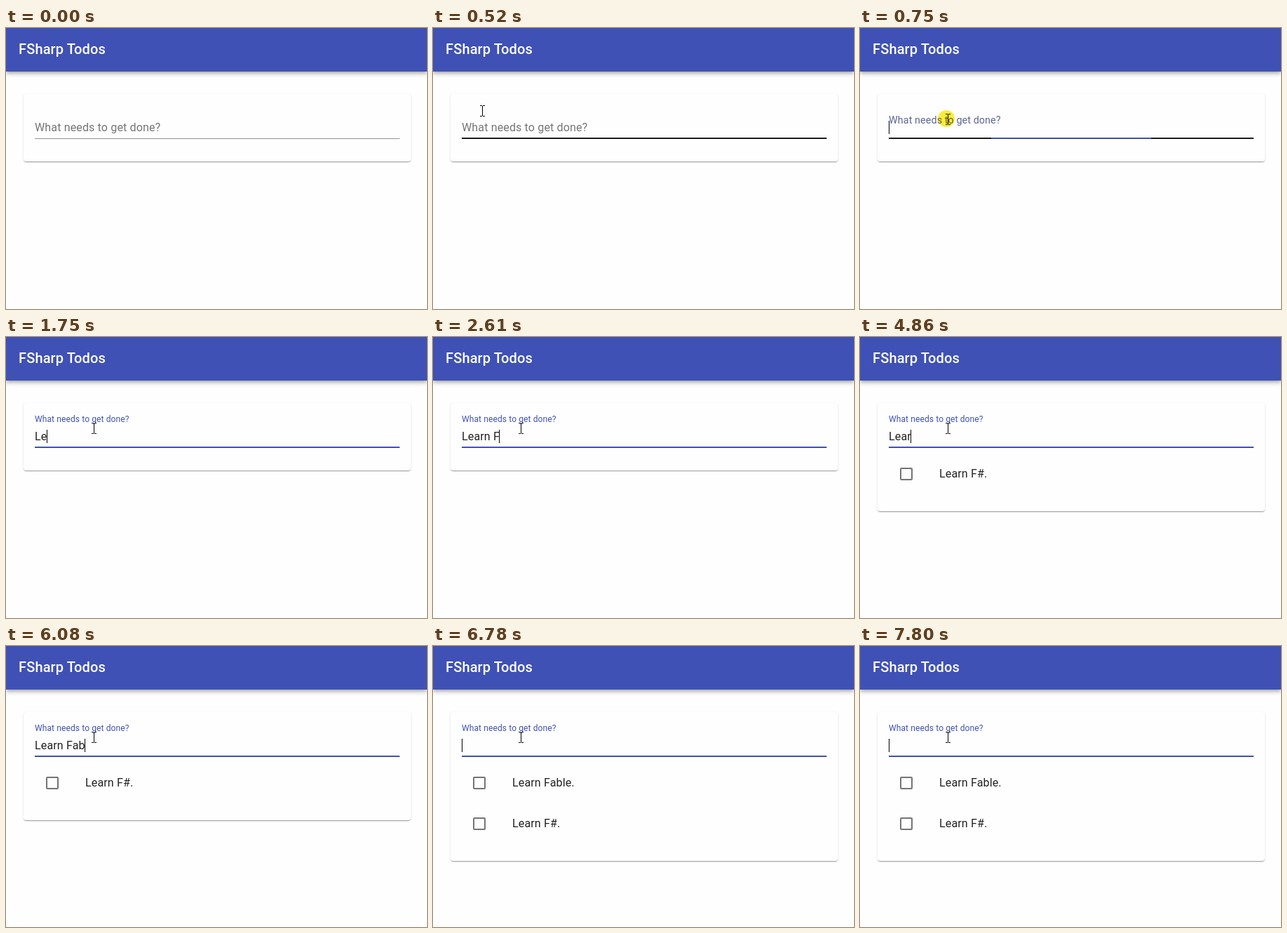
These frames come from a looping animation (600 by 400 pixels, 8 s). An HTML page:

```html
<!DOCTYPE html>
<html lang="en">
<head>
<meta charset="utf-8">
<title>FSharp Todos</title>
<style>
html, body { margin: 0; width: 100%; height: 100%; overflow: hidden; background: #fefefe; }
body { position: relative; font: 16px/19px Roboto, sans-serif; letter-spacing: .00938em; color: rgba(0,0,0,.87); }
body > *, .row * { position: absolute; white-space: pre; }
header { left: 0; top: 0; width: 100%; height: 62px; background: #3f51b5;
  box-shadow: 0 2px 4px -1px rgba(0,0,0,.2), 0 4px 5px rgba(0,0,0,.14), 0 1px 10px rgba(0,0,0,.12); }
h1 { margin: 0; position: absolute; left: 18px; top: 14px; font: 500 20px/32px Roboto, sans-serif;
  letter-spacing: .0075em; color: #fff; }
#card { left: 25px; top: 94px; width: 552px; border-radius: 4px; background: #fefefe;
  box-shadow: 0 2px 1px -1px rgba(0,0,0,.2), 0 1px 1px rgba(0,0,0,.14), 0 1px 3px rgba(0,0,0,.12); }
#label { left: 41px; top: 110px; line-height: 1; transform-origin: 0 0; }
#value { left: 41px; top: 132px; }
#caret { top: 132px; width: 1px; height: 19px; background: #000; }
#line, #focus { left: 41px; width: 520px; }
#focus { top: 156px; height: 2px; background: #3f51b5; }
.row { left: 0; }
.row i { box-sizing: border-box; left: 57px; top: -9px; width: 18px; height: 18px;
  border: 2px solid #757575; border-radius: 2px; }
.row span { left: 113px; top: -12.5px; line-height: 24px; }
#click { left: 111px; top: 117px; width: 24px; height: 24px; border-radius: 50%;
  background: #fdec3c; mix-blend-mode: multiply; }
#pointer { left: 0; top: 0; width: 600px; height: 400px; }
</style>
</head>
<body>
<header><h1>FSharp Todos</h1></header>
<div id="card"></div>
<div id="line"></div>
<div id="focus"></div>
<div id="label">What needs to get done?</div>
<div id="value"></div>
<div id="caret"></div>
<div class="row" id="row0"><i></i><span></span></div>
<div class="row" id="row1"><i></i><span></span></div>
<div id="click"></div>
<svg id="pointer">
  <path id="arrow" d="M0 0V16L4 12.500L6.500 18L9 17L6.500 11.500H11.500Z" fill="#fff" stroke="#000"/>
  <path id="beam" d="M-3-7.500H0M1-7.500H4M.5-7V7M-3 7.500H0M1 7.500H4" fill="none" stroke="#000" shape-rendering="crispEdges"/>
</svg>
<script>
const LOOP = 8000, FOCUS = 717;
const el = id => document.getElementById(id);
const clamp = x => Math.min(1, Math.max(0, x));
const mix = (a, b, k) => a + (b - a) * k;
const show = (node, on) => { node.style.visibility = on ? "visible" : "hidden"; };

// "\n" submits the typed text
const keys = [
  [1520, "L"], [1750, "e"], [1830, "ar"], [1980, "n"], [2210, " "],
  [2610, "F"], [3160, "#"], [3460, "."], [3860, "\n"],
  [4470, "L"], [4700, "e"], [4780, "a"], [4860, "r"], [5390, "n"], [5620, " "],
  [5850, "F"], [5930, "a"], [6080, "b"], [6250, "l"], [6320, "e"], [6550, "."], [6780, "\n"]
];
const blinks = [[0, FOCUS], [1290, 1520], [4390, 4470], [7330, 7800]];

// cubic-bezier(0, 0, .2, 1)
function easeOut(x) {
  let lo = 0, hi = 1;
  for (let i = 0; i < 24; i++) {
    const s = (lo + hi) / 2;
    if (.6 * (1 - s) * s * s + s ** 3 < x) lo = s; else hi = s;
  }
  return 3 * (1 - lo) * lo * lo + lo ** 3;
}

function drawField(t) {
  const k = easeOut(clamp((t - FOCUS) / 200));
  const rgb = [[117, 63], [117, 81], [117, 181]].map(([a, b]) => mix(a, b, k));
  el("label").style.color = `rgb(${rgb})`;
  el("label").style.transform = `translateY(${mix(24, 1.5, k)}px) scale(${mix(1, .75, k)})`;
  el("focus").style.transform = `scaleX(${k})`;
  const hover = t >= 440, line = el("line").style;
  line.top = hover ? "156px" : "157px";
  line.height = hover ? "2px" : "1px";
  line.background = hover ? "#1c1c1c" : "#949494";
}

function drawPointer(t) {
  const k = 1 - (1 - clamp((t - 370) / 300)) ** 2;
  const x = Math.round(mix(26, 125, k)), y = Math.round(mix(109, 130, k));
  for (const id of ["arrow", "beam"]) {
    el(id).setAttribute("transform", `translate(${x} ${y})`);
    show(el(id), t >= 370 && (id === "beam") === (x > 41));
  }
  show(el("click"), t >= 740 && t < 900);
}

function drawTodos(t) {
  let text = "";
  const todos = [];
  for (const [time, chars] of keys) {
    if (time > t) break;
    if (chars === "\n") { todos.unshift(text); text = ""; }
    else text += chars;
  }
  el("value").textContent = text;
  el("caret").style.left = 41 + Math.floor(el("value").getBoundingClientRect().width) + "px";
  show(el("caret"), !blinks.some(([from, to]) => t >= from && t < to));
  el("card").style.height = 96 + 58 * todos.length + "px";
  [0, 1].forEach(i => {
    const row = el("row" + i);
    row.style.top = 195 + 58 * i + "px";
    row.lastChild.textContent = todos[i] || "";
    show(row, i < todos.length);
  });
}

function frame() {
  const t = performance.now() % LOOP;
  // the opening gesture advances in 76 ms steps
  const step = t < 370 ? t : 370 + 76 * Math.floor((t - 370) / 76);
  drawField(step);
  drawPointer(step);
  drawTodos(t);
  requestAnimationFrame(frame);
}
frame();
</script>
</body>
</html>
```
